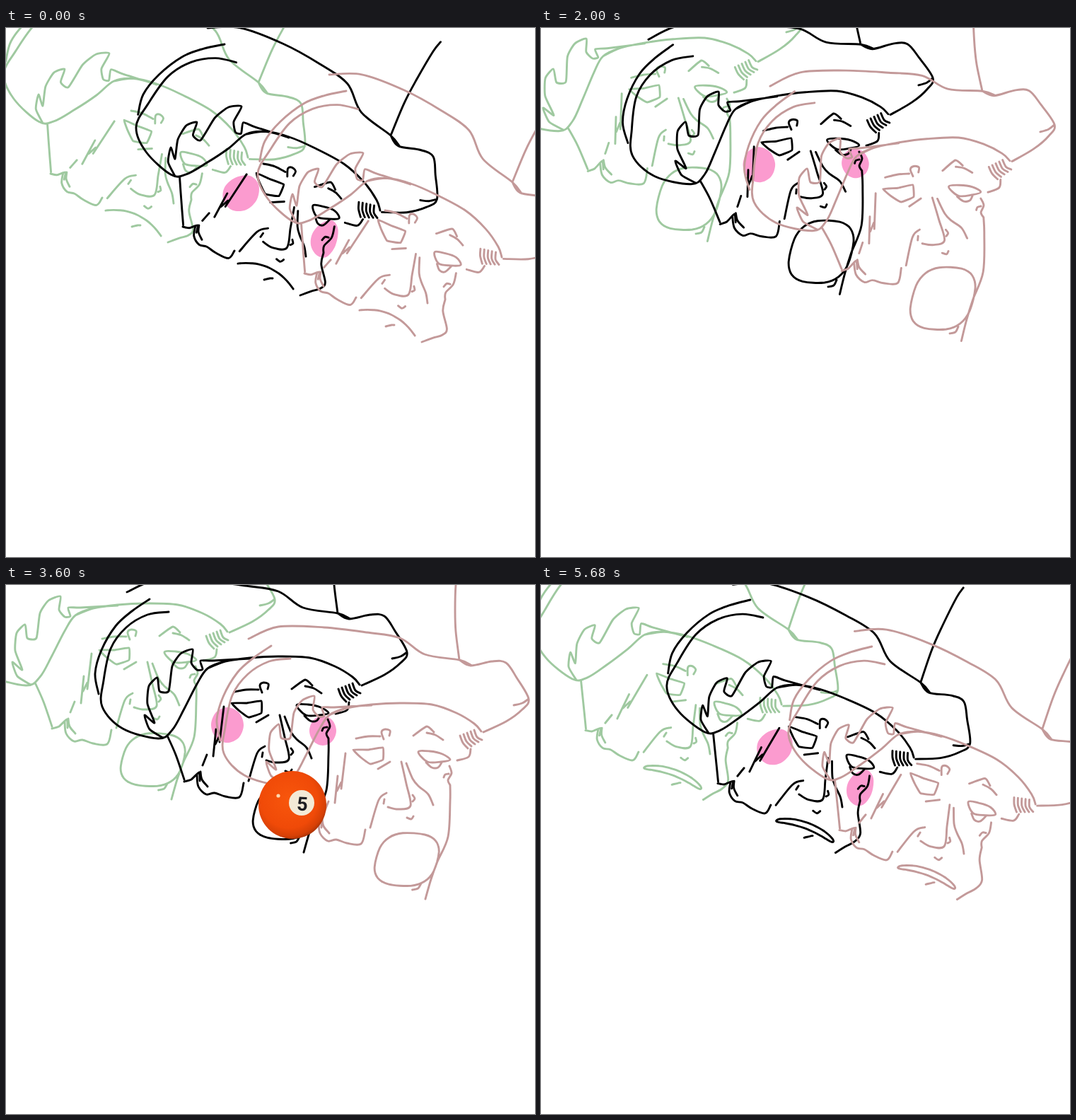
An HTML page that plays this animation: 748 px wide and 748 px high, repeating every 5760 ms.

```html
<!DOCTYPE html>
<html lang="en">
<head>
<meta charset="utf-8">
<title>Hat heads</title>
<style>
html, body { margin: 0; width: 100%; height: 100%; overflow: hidden; background: #fff; }
svg { display: block; width: 100vw; height: 100vh; }
.line { fill: none; stroke-width: 2.9; stroke-linecap: round; stroke-linejoin: round; }
</style>
</head>
<body>
<svg viewBox="0 0 748 748">
  <defs>
    <radialGradient id="skin" cx=".45" cy=".42" r=".6">
      <stop offset="0" stop-color="#f8560c"/>
      <stop offset=".7" stop-color="#f04a08"/>
      <stop offset=".9" stop-color="#d64006"/>
      <stop offset="1" stop-color="#a53204"/>
    </radialGradient>
  </defs>
  <path id="blush" fill="#fb9bcf"/>
  <path class="line" stroke="#9fc9a0" transform="translate(-187 -75)"/>
  <path class="line" stroke="#000"/>
  <path class="line" stroke="#c39999" transform="translate(172 66)"/>
  <g id="ball">
    <circle r="48" fill="url(#skin)"/>
    <circle cx="-20" cy="-13" r="2.6" fill="#ffd9b0"/>
    <circle cx="13" cy="-3" r="18" fill="#f3ead6"/>
    <text x="14" y="8" text-anchor="middle" font-family="Roboto, sans-serif" font-size="27" font-weight="600" fill="#1d1d20" transform="rotate(3 14 -2)">5</text>
  </g>
</svg>
<script>
const FRAME = 80, CYCLE = 36;
const parse = s => s.trim().split(/\s+/).map(p => p.split(',').map(Number));

// Landmarks: place in the middle pose, with the head lowered, with the head raised.
const pins = parse(`
  567,96,609,243,500,3     469,40,544,152,390,-19   464,-66,604,33,367,-66
  171,10,285,0,97,48       203,20,309,23,144,47     136,172,184,140,114,213
  222,214,240,208,210,233  270,140,315,170,237,140  385,101,435,169,334,65
  500,141,529,258,452,68   264,91,333,111,210,95    196,184,233,169,173,203
  252,278,250,281,259,276  336,280,323,315,339,252  305,197,324,230,282,187
  319,167,354,205,286,150  411,170,434,251,378,131  456,181,471,269,421,122
  400,246,397,311,388,200  432,245,424,323,418,190  399,264,386,329,395,220
  456,217,449,318,437,163  438,325,445,368,446,300  421,378,416,378,428,368`);

// Thin-plate spline through the landmarks carries the one drawing to the other poses.
const bump = (dx, dy) => { const q = dx * dx + dy * dy; return q ? q * Math.log(q) : 0; };
const basis = (x, y) => [...pins.map(p => bump(x - p[0], y - p[1])), 1, x, y];

function solve(m) {
  const n = m.length;
  for (let i = 0; i < n; i++) {
    let best = i;
    for (let r = i + 1; r < n; r++) if (Math.abs(m[r][i]) > Math.abs(m[best][i])) best = r;
    [m[i], m[best]] = [m[best], m[i]];
    m[i] = m[i].map((v, _, row) => v / row[i]);
    for (let r = 0; r < n; r++) {
      const f = m[r][i];
      if (r !== i && f) m[r] = m[r].map((v, k) => v - f * m[i][k]);
    }
  }
  return m.map(row => row.slice(n));
}

const weights = solve([
  ...pins.map(p => [...basis(p[0], p[1]), ...p.slice(2)]),
  ...[0, 1, 2].map(k => [...pins.map(p => [1, p[0], p[1]][k]), 0, 0, 0, 0, 0, 0, 0])
]);

function pinned([x, y]) {
  const b = basis(x, y);
  const [lx, ly, hx, hy] = [0, 1, 2, 3].map(k => b.reduce((s, v, i) => s + v * weights[i][k], 0));
  return { low: [lx, ly], mid: [x, y], high: [hx, hy] };
}

const lines = [], cheeks = [];
const add = (list, pts, closed, bend) => list.push({ pts: pts.map(pinned), closed, bend });
const line = (s, bend = 1) => add(lines, parse(s), false, bend);
const loop = (s, bend = 1) => add(lines, parse(s), true, bend);
const oval = (cx, cy, rx, ry) => add(cheeks, [...Array(8).keys()].map(i =>
  [cx + rx * Math.cos(i * Math.PI / 4), cy + ry * Math.sin(i * Math.PI / 4)]), true, 1);

// hat
line('171,10 213,-7 278,-6 338,1 385,9 420,32 469,40 487,48');
line('131,154 126,125 135,92 155,58 178,37 203,20');
line('230,38 200,42 170,60 148,90 138,135 136,172 165,203 215,217 235,205 252,175 270,140 285,118 310,108 345,103');
line('285,118 310,108 345,103 385,101 430,103 465,115 490,130 500,141');
line('469,40 485,48 515,42 535,44 550,65 567,95 558,110 535,127 503,142');
line('546,104 558,101 567,95');
line('467,-80 464,-66 463,-30 464,0 469,40');
line('222,216 203,204 196,184 210,195 200,168 202,143 214,131 217,150 230,150 235,115 247,97 264,91 262,110 270,120 278,119 275,107 292,107 345,104', 0.6);

// ear, beard and left cheek
line('228,213 240,240 252,275');
line('252,278 262,275 273,265 274,277', 0.6);
line('270,268 272,285 283,296 295,294 310,299 330,300 336,280');
line('275,264 277,275 285,285');
line('308,172 302,222');
line('297,204 293,242');
line('284,240 278,255');
line('302,213 296,225');

// left eye and brow
loop('319,167 340,167 361,164 361,181 343,187 330,178', 0.3);
line('323,151 340,148 357,148');
line('362,152 359,142 364,138 371,140 370,147');
line('354,194 371,184');

// nose
line('387,184 394,215 400,246 383,251 368,248');
line('394,186 403,208 412,219 425,230 432,245');
line('403,240 406,236 403,231');
line('363,237 362,243');
line('366,228 355,238 343,277');
line('395,263 401,265 404,261');

// right eye, brow, lashes and jaw
loop('411,170 427,169 445,173 456,181 443,184 424,184');
line('422,185 430,192 439,192 444,185');
line('404,147 423,134 433,142', 0.6);
line('423,143 435,146 446,153');
for (let i = 0; i < 5; i++) {
  const x = 470 + 5 * i, y = 147 - 2 * i;
  add(lines, [[x, y], [x + 4, y + 10], [x + 11, y + 18 - i]], false, 1);
}
line('466,182 482,177 485,166');
line('455,190 458,200 453,210 456,217');
line('447,206 449,202 454,201');
line('456,217 456,240 453,290 438,325 429,350 421,378');

oval(313, 198, 23, 25);
oval(448, 206, 19, 21);

// Raises and lowers the head, slowing a little between poses.
function tilt(n) {
  const m = 18 - Math.abs(18 - n);
  return m - 0.43 * Math.sin(Math.PI * m / 9) ** 2;
}

// Parabola through the values at tilt 0, 9 and 17.
function arc(a, b, c, d) {
  const s = (b - a) / 9, r = (c - b) / 8;
  return a + s * d + (r - s) / 17 * d * (d - 9);
}

function spline(pts, closed, bend = 1) {
  const n = pts.length, t = bend / 6;
  const at = i => closed ? pts[(i + n) % n] : pts[Math.max(0, Math.min(n - 1, i))];
  const fix = (x, y) => x.toFixed(1) + ' ' + y.toFixed(1) + ' ';
  let out = 'M' + fix(...pts[0]);
  for (let i = 0; i < (closed ? n : n - 1); i++) {
    const [a, b, c, e] = [at(i - 1), at(i), at(i + 1), at(i + 2)];
    out += 'C' + fix(b[0] + (c[0] - a[0]) * t, b[1] + (c[1] - a[1]) * t) +
      fix(c[0] - (e[0] - b[0]) * t, c[1] - (e[1] - b[1]) * t) + fix(...c);
  }
  return out + (closed ? 'Z' : '');
}

const curve = (s, d) => spline(
  s.pts.map(p => [0, 1].map(k => arc(p.low[k], p.mid[k], p.high[k], d))), s.closed, s.bend);

// The mouth grows from a tilted, arched line into a tall rounded box.
function mouth(d) {
  const cx = 367 + 32 * (1 - Math.exp(-d / 4.5)), cy = 351 - 3.2 * d;
  const half = 4.6 * d - 0.045 * d * d;
  const turn = 0.43 * Math.exp(-d / 5), sag = 13 * Math.exp(-d / 2);
  const round = v => Math.sign(v) * Math.abs(v) ** 0.75;
  const rim = [...Array(24).keys()].map(i => {
    const u = round(Math.cos(i * Math.PI / 12)), v = half * round(Math.sin(i * Math.PI / 12));
    const x = 43 * u - 0.2 * v, y = v - sag * (1 - u * u);
    return [cx + x * Math.cos(turn) - y * Math.sin(turn), cy + x * Math.sin(turn) + y * Math.cos(turn)];
  });
  const tx = cx + 6 + 1.1 * d, ty = cy + 3 + half;
  return spline(rim, true) + spline([[tx - 8, ty + 2], [tx, ty], [tx + 4, ty - 0.7 * d]], false);
}

const heads = document.querySelectorAll('.line');
const blush = document.getElementById('blush');
const ball = document.getElementById('ball');

function draw(n) {
  const d = tilt(n), k = n - 9;
  const ink = lines.map(s => curve(s, d)).join('') + mouth(d);
  heads.forEach(h => h.setAttribute('d', ink));
  blush.setAttribute('d', cheeks.map(s => curve(s, d)).join(''));
  ball.style.display = n >= 9 && n < 23 ? '' : 'none';
  ball.setAttribute('transform', `translate(${405 + 20.75 * k} ${311 + 4.25 * k + 5.1 * k * (k - 8)})`);
}

let last = -1;
const start = performance.now();
function tick() {
  const n = Math.floor((performance.now() - start) / FRAME) % CYCLE;
  if (n !== last) draw(last = n);
  requestAnimationFrame(tick);
}
tick();
</script>
</body>
</html>
```
